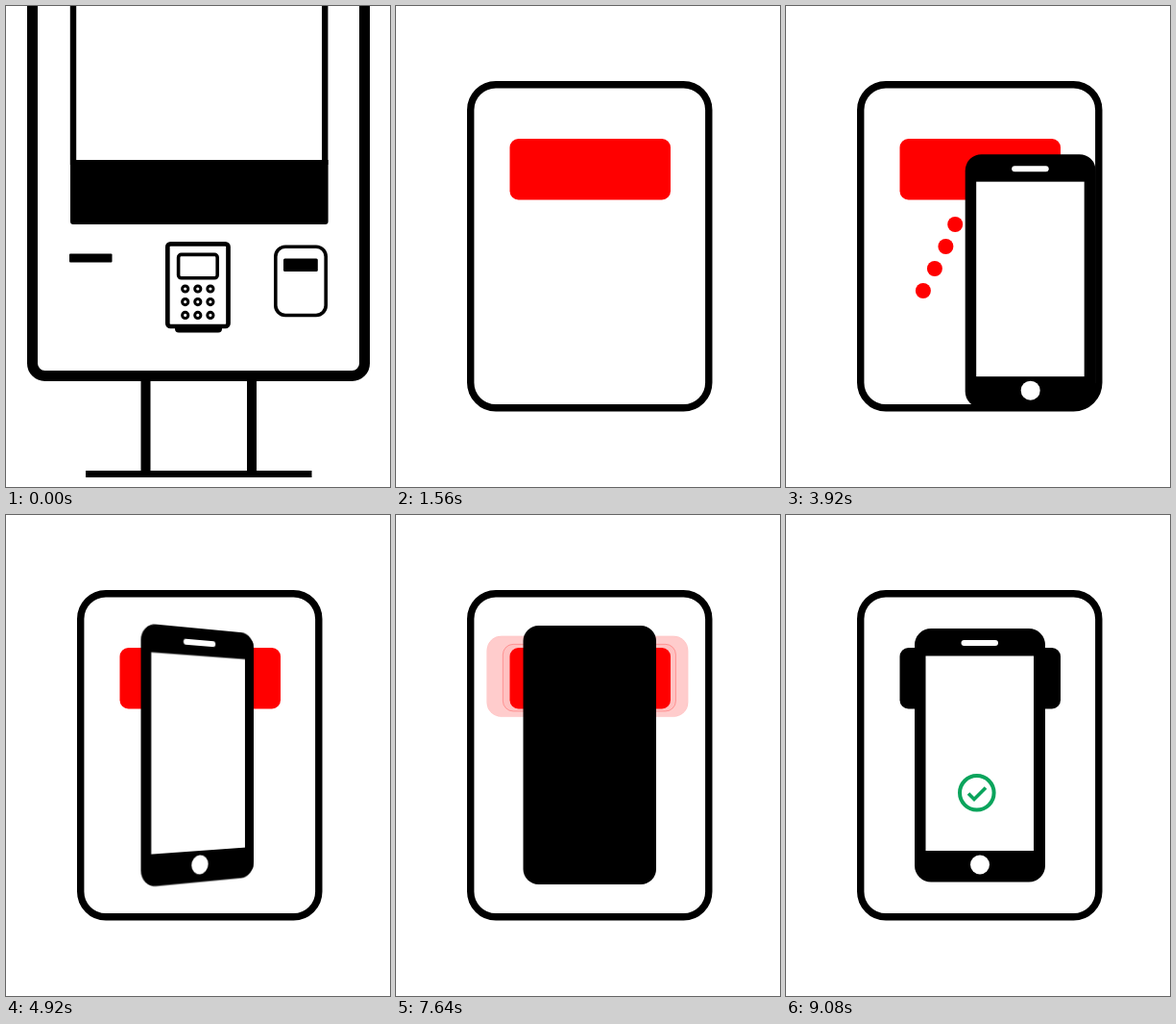
An HTML page for the animation above (10 s loop, 400x500 px).

```html
<!DOCTYPE html>
<html lang="en">
<head>
<meta charset="utf-8">
<title>Scan at the kiosk</title>
<style>
  html, body { margin: 0; width: 100%; height: 100%; overflow: hidden; background: #fff; }
  #stage { position: relative; width: 400px; height: 500px; overflow: hidden; background: #fff; }
  svg { position: absolute; left: 0; top: 0; display: block; }
  #phone { position: absolute; left: 0; top: 0; width: 400px; height: 500px; transform-origin: 202px 249.5px; }
</style>
</head>
<body>
<div id="stage">
  <svg width="400" height="500" viewBox="0 0 400 500">
    <g id="kiosk">
      <rect x="27.5" y="-60" width="346" height="444.5" rx="13" fill="none" stroke="#000" stroke-width="11"/>
      <path d="M70 -60V165M332.2 -60V165" stroke="#000" stroke-width="6.4"/>
      <path d="M67 160H335.6V224a3 3 0 0 1 -3 3H70a3 3 0 0 1 -3 -3z"/>
      <rect x="66" y="257.5" width="44.5" height="9" rx="1"/>
      <rect x="176" y="331" width="49" height="8.5" rx="4"/>
      <rect x="168.3" y="247.3" width="63.2" height="85.7" rx="3" fill="#fff" stroke="#000" stroke-width="4.7"/>
      <rect x="179.6" y="258.4" width="40.6" height="24.4" rx="3" fill="none" stroke="#000" stroke-width="3.6"/>
      <g id="keys" fill="#fff" stroke="#000" stroke-width="3"></g>
      <path d="M145.5 389V485M256 389V485" stroke="#000" stroke-width="10"/>
      <rect x="83" y="483" width="235.5" height="7"/>
    </g>
    <rect id="reader" fill="#fff" stroke="#000"/>
    <g id="halos" fill="#f00" stroke="#f00"><rect/><rect/></g>
    <rect id="bar"/>
    <g id="dots" fill="#f00"></g>
  </svg>
  <div id="phone">
    <svg id="front" width="400" height="500" viewBox="0 0 400 500">
      <rect x="134" y="118" width="136" height="263.5" rx="17"/>
      <rect x="145.5" y="146.5" width="112.5" height="202.5" fill="#fff"/>
      <rect x="182.5" y="130" width="38.5" height="6" rx="3" fill="#fff"/>
      <circle cx="202" cy="363.5" r="10" fill="#fff"/>
      <g id="check" fill="none" stroke="#0aa45c" stroke-width="4">
        <circle cx="198.8" cy="288.8" r="17.8"/>
        <path d="M190 289.5L196 295.5L208 283.5" stroke-width="3.6"/>
      </g>
    </svg>
    <svg id="back" width="400" height="500" viewBox="0 0 400 500">
      <rect x="133" y="115" width="138.5" height="269" rx="16"/>
    </svg>
  </div>
</div>
<script>
const LOOP = 10000, STEP = 40;
const $ = id => document.getElementById(id);
const clamp = u => Math.min(1, Math.max(0, u));
const span = (t, a, b) => clamp((t - a) / (b - a));
const mix = (a, b, u) => a + (b - a) * u;
const mixAll = (a, b, u) => a.map((v, i) => mix(v, b[i], u));
const sineInOut = u => (1 - Math.cos(Math.PI * u)) / 2;

function set(el, attrs) {
  for (const k in attrs) el.setAttribute(k, attrs[k]);
}

function circle(parent, cx, cy, r) {
  const c = document.createElementNS(parent.namespaceURI, 'circle');
  set(c, { cx, cy, r });
  parent.append(c);
  return c;
}

// box = left, top, right, bottom of the outer edge
function setBox(el, [l, t, r, b], radius, line = 0) {
  const h = line / 2;
  set(el, {
    x: l + h, y: t + h, width: r - l - line, height: b - t - line,
    rx: radius - h, 'stroke-width': line
  });
}

// small, zoomed in, settled
const READER = [[279, 248.5, 335, 323.3], [74, 78, 331.5, 422.5], [74, 78, 329.5, 421.5]];
const BAR = [[289, 262.5, 324.8, 276], [118.5, 138, 286, 201.5]];
const HALO = [91, 124, 307, 211];
const MID = 0.485;

for (const y of [294, 307.6, 321.4])
  for (const x of [186.7, 199.8, 212.9]) circle($('keys'), x, y, 3.1);

const dots = [];
[[26.2, 227], [36, 250], [47.5, 273], [59.5, 296]].forEach(([dx, y], i) => {
  for (const side of [-1, 1])
    dots.push({ el: circle($('dots'), 202.4 + side * dx, y, 8), at: 1720 + i * 200 });
});

function drawZoom(t) {
  const p = sineInOut(span(t, 0, 1060));
  const settle = span(t, 1060, 1560);
  const s = 1 + 3.71 * p;
  const cx = mix(306.8, 201.8, p), cy = mix(285.7, 249.8, p);
  set($('kiosk'), { transform: `translate(${cx} ${cy}) scale(${s}) translate(-306.8 -285.7)` });

  const early = clamp(p / MID), late = clamp((p - MID) / (1 - MID));
  const line = mix(mix(3.6, 8, early), 7.4, late);
  const radius = mix(mix(12, 29, early), 30, late);
  const box = mixAll(mixAll(READER[0], READER[1], p), READER[2], settle);
  setBox($('reader'), box, radius, line);

  setBox($('bar'), mixAll(...BAR, p), mix(1.5, 9, p));
  const red = 255 * settle * (1 - span(t, 8500, 9080));
  set($('bar'), { fill: `rgb(${Math.round(red)},0,0)` });
}

function drawHalos(t) {
  [...$('halos').children].forEach((el, i) => {
    const age = t - 6000 - i * 500;
    const on = age > 0 && age < 2000;
    const u = on ? age % 1000 / 1000 : 0;
    const grow = 1 - (1 - u) ** 2;
    setBox(el, mixAll(BAR[1], HALO, grow), mix(9, 16, grow));
    set(el, {
      visibility: on ? 'visible' : 'hidden',
      'stroke-width': 1,
      'fill-opacity': 0.2 * Math.min(1, u * 2, (1 - u) / 0.3),
      'stroke-opacity': 0.35 * (1 - u) ** 2
    });
  });
}

function drawPhone(t) {
  const phone = $('phone');
  phone.style.visibility = t >= 3400 ? 'visible' : 'hidden';
  const away = (1 - span(t, 3360, 4240)) ** 1.63;
  const turn = 180 * (span(t, 4760, 5720) + span(t, 8000, 9080));
  const showBack = turn > 90 && turn < 270;
  phone.style.transform =
    `translate(${274 * away}px, ${188 * away}px)` +
    (turn % 360 ? ` perspective(800px) rotateY(${turn}deg)` : '');
  $('front').style.display = showBack ? 'none' : 'block';
  $('back').style.display = showBack ? 'block' : 'none';
  $('check').style.display = t > 8000 ? 'inline' : 'none';
}

const start = performance.now();

function draw() {
  const t = Math.floor((performance.now() - start) % LOOP / STEP) * STEP;
  drawZoom(t);
  for (const d of dots) set(d.el, { visibility: t >= d.at && t < 4760 ? 'visible' : 'hidden' });
  drawHalos(t);
  drawPhone(t);
  requestAnimationFrame(draw);
}
draw();
</script>
</body>
</html>
```
